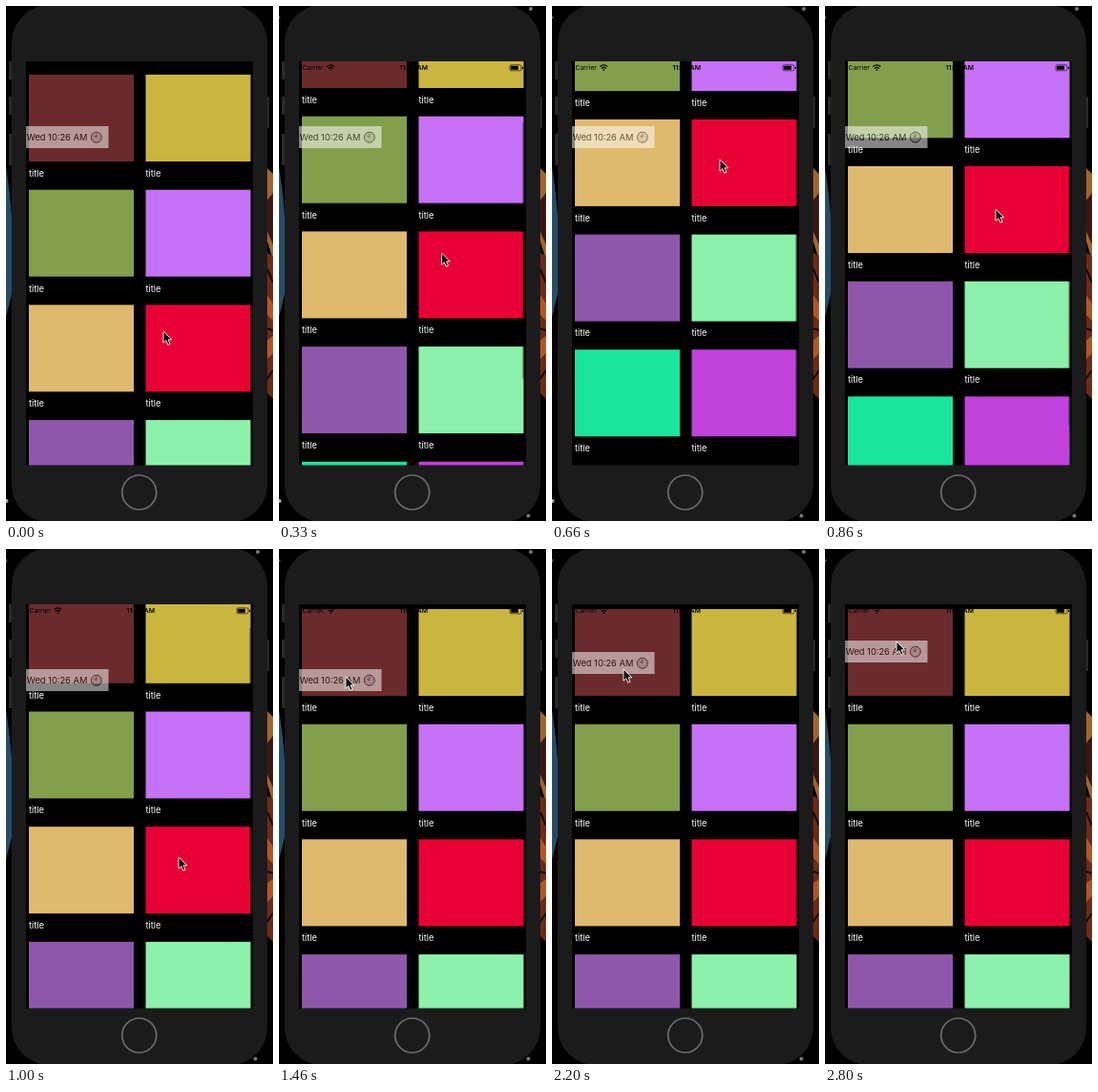
Recreate the animation shown at these times as an HTML page. Size 280x540 px, loop 3000 ms.

```html
<!DOCTYPE html>
<html lang="en">
<head>
<meta charset="utf-8">
<title>Scrolling grid with floating label</title>
<style>
  html, body { margin: 0; width: 100%; height: 100%; overflow: hidden; background: #000; }
  svg { display: block; width: 100%; height: 100%; }
  text { font-family: Inter, Roboto, sans-serif; }
</style>
</head>
<body>
<svg viewBox="0 0 280 540">
  <defs>
    <clipPath id="screen"><rect x="21" y="58" width="238" height="423.5"/></clipPath>
  </defs>
  <rect width="280" height="540"/>

  <!-- desktop behind the phone -->
  <path d="M0 169 C4 195 6 215 7 240 V298 C4 310 2 318 0 326 Z" fill="#254c68"/>
  <path d="M272 168 L280 176 V266 L272 240 Z" fill="#a4632a"/>
  <path d="M272 206 L280 196 V250 L272 232 Z" fill="#3c1510"/>
  <path d="M272 258 L280 262 V412 L272 404 Z" fill="#6e2a14"/>
  <path d="M272 300 L280 312 V330 L272 322 Z M272 352 L280 346 V364 L272 372 Z" fill="#b4561f"/>
  <path d="M274 276 L280 290 M273 338 L280 340 M273 392 L280 382" stroke="#160605" stroke-width="2"/>
  <g id="dots" fill="#777"><circle cx="264" cy="3" r="2"/><circle cx="261.500" cy="534.500" r="2"/></g>
  <circle id="dotTop" cx="0" cy="12" r="1.500" fill="#555"/>
  <circle id="dotLow" cx="0.500" cy="519" r="2" fill="#aaa"/>

  <!-- phone -->
  <path d="M3 58h4v19h-4z M3 95h4v19h-4z M3 134h4v33h-4z M273 95h3v33h-3z" fill="#292929"/>
  <rect x="6" y="-1" width="268" height="542" rx="39" fill="#1b1b1c"/>
  <circle cx="139.700" cy="510" r="18" fill="#1b1b1c" stroke="#6c6c6c" stroke-width="1.700"/>
  <rect x="21" y="58" width="238" height="423.500"/>

  <g clip-path="url(#screen)">
    <g id="grid" fill="#fff" font-size="9.300"></g>
    <g font-size="6.800">
      <text x="24.500" y="67.200">Carrier</text>
      <text x="141.300" y="67.200" font-weight="600" text-anchor="middle">11:26 AM</text>
      <g fill="none" stroke="#000" stroke-width="1.300">
        <path d="M50.300 63.500 Q54.300 60.300 58.300 63.500 M51.900 65.400 Q54.300 63.500 56.700 65.400"/>
        <path d="M53.600 67 h1.400"/>
      </g>
      <rect x="242" y="61.800" width="12" height="6" rx="1.300" fill="none" stroke="#000" stroke-width=".6"/>
      <path d="M243 62.800h8v4h-8z M254.900 63.700h1v2.200h-1z"/>
    </g>
    <rect id="bar" x="255.300" width="1.500" height="269" rx=".7" opacity=".35"/>
    <g id="label" opacity=".52">
      <rect x="21" width="86.500" height="23" fill="#fff"/>
      <text x="21.700" y="15.200" font-size="9.300">Wed 10:26 AM</text>
      <circle cx="94.800" cy="11.700" r="5.500" fill="#e4dcdc" stroke="#333" stroke-width="1"/>
      <circle cx="94.800" cy="11.700" r="3.900" fill="none" stroke="#777" stroke-width=".6" stroke-dasharray=".6 1.440"/>
      <path d="M92.300 10.300 L94.800 11.700 V8.200" fill="none" stroke="#333" stroke-width=".8"/>
    </g>
  </g>
  <path id="cursor" d="M0 0 V12.200 L2.800 9.600 L4.800 14.200 L7 13.200 L5 8.800 H8.800 Z"
        fill="#000" stroke="#fff" stroke-width=".9" stroke-linejoin="round"/>
</svg>
<script>
const LOOP = 3000, STEP = 1000 / 15;
const ROW = 120.7, COLS = [24, 146.5];
const COLORS = ['#6b2b2c', '#cab63e', '#839e4c', '#c572f6', '#dfb96e',
                '#e80134', '#8f57ab', '#8bf0a9', '#19e59c', '#c141dc'];
const $ = id => document.getElementById(id);

// Tracks are [step, value] pairs, eased between points.
const scroll = [[3, 72], [4, 40], [5, -5], [6, -55], [7, -98.4], [8, -114], [9, -120], [11, -125],
                [12, -125], [13, -73.4], [14, -12], [15, 49.8], [16, 63]];
const label = [[24, 126], [28.5, 302], [32, 136], [33, 108], [36, 66], [40, 96]];
const grip = [[24, 8], [28.5, 8], [31, 16], [33, 18], [36, 8], [40, 1]];
const pointerX = [[3, 165], [7, 176], [12, 176], [13, 179], [15, 181], [17, 181], [22, 70], [24, 70], [33, 75]];
const pointerY = [[3, 341], [4, 307], [5, 259], [6, 205], [7, 161], [12, 161],
                  [13, 213], [15, 323], [16, 326], [17, 326], [22, 134]];
const barFade = [[3, 0], [4, .35], [17, .35], [22, 0]];

function at(track, k) {
  const i = track.findIndex(p => p[0] > k);
  if (i === 0) return track[0][1];
  if (i < 0) return track[track.length - 1][1];
  const [k0, a] = track[i - 1], [k1, b] = track[i];
  const u = (k - k0) / (k1 - k0);
  return a + (b - a) * u * u * (3 - 2 * u);
}

const move = (id, x, y) => $(id).setAttribute('transform', `translate(${x} ${y})`);
const show = (id, on) => $(id).setAttribute('visibility', on ? 'visible' : 'hidden');

$('grid').innerHTML = COLORS.map((color, i) => {
  const x = COLS[i % 2], y = Math.floor(i / 2) * ROW;
  return `<rect x="${x}" y="${y}" width="110" height="91" fill="${color}"/>` +
         `<text x="${x}" y="${y + 106.8}">title</text>`;
}).join('');

function draw(ms) {
  const k = Math.floor((ms % LOOP + 6.7) / STEP);
  const top = at(scroll, k), labelY = at(label, k);
  move('grid', 0, top);
  move('label', 0, labelY);
  move('cursor', at(pointerX, k), k < 24 ? at(pointerY, k) : labelY + at(grip, k));
  $('bar').setAttribute('y', 73 + (63 - Math.min(top, 63)) / 188 * 136);
  $('bar').setAttribute('opacity', at(barFade, k));
  show('dots', k >= 4 && k < 42);
  show('dotTop', k >= 4);
  show('dotLow', k < 13);
}

const start = performance.now();
function tick() {
  draw(performance.now() - start);
  requestAnimationFrame(tick);
}
tick();
</script>
</body>
</html>
```
